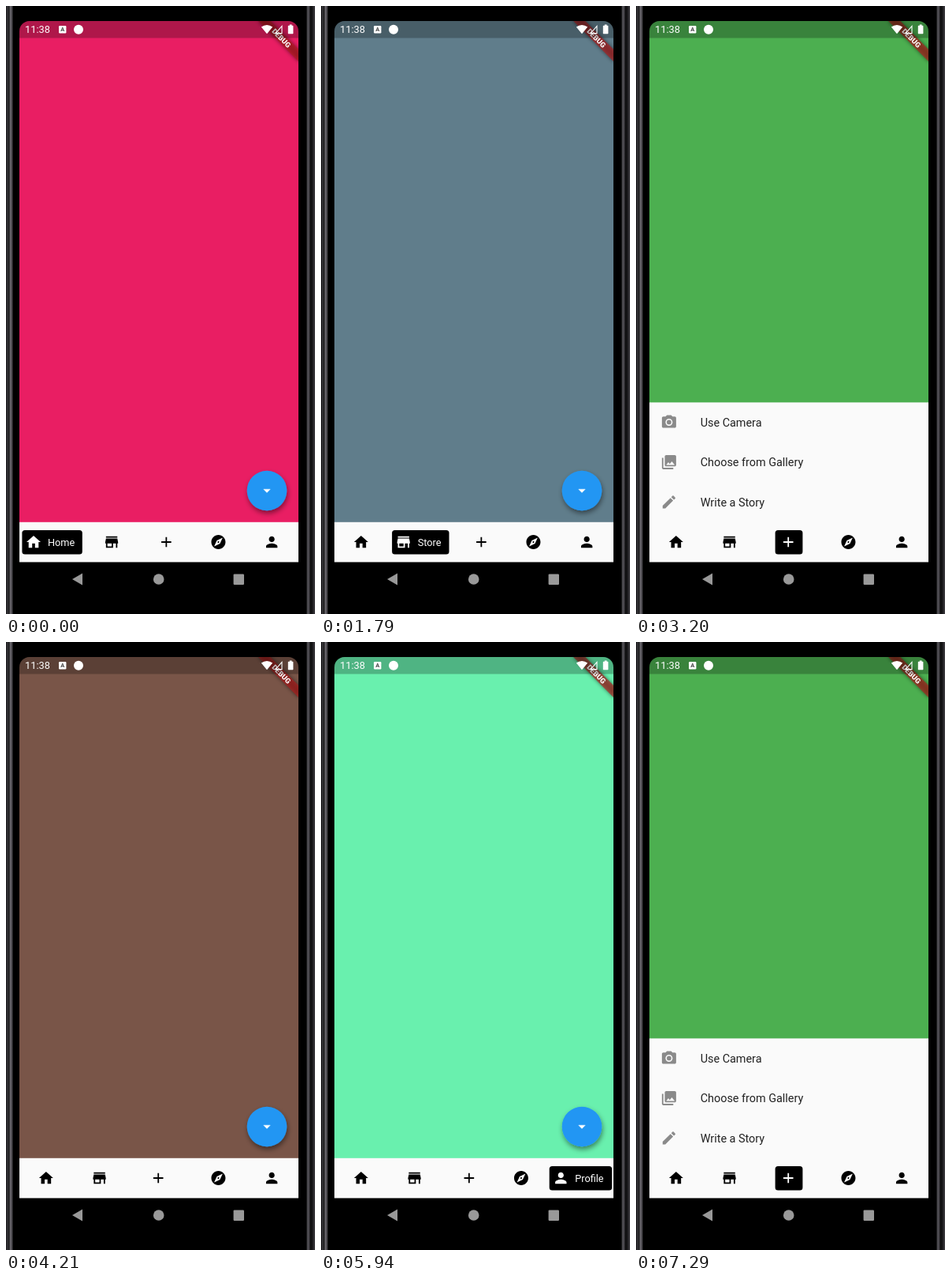
Write an HTML page that moves like this. It is 392 by 769 pixels and loops after 8000 ms.

```html
<!DOCTYPE html>
<html lang="en">
<head>
<meta charset="utf-8">
<title>Tab bar demo</title>
<style>
  html, body { margin: 0; width: 100%; height: 100%; overflow: hidden; background: #000; }
  svg { display: block; width: 100%; height: 100%; font-family: Roboto, "Noto Sans", sans-serif; }
</style>
</head>
<body>
<svg viewBox="0 0 392 769" preserveAspectRatio="xMidYMid meet">
  <defs>
    <linearGradient id="rimL">
      <stop offset="0" stop-color="#1b1a1d"/>
      <stop offset=".3" stop-color="#39383b"/>
      <stop offset=".42" stop-color="#111"/>
      <stop offset=".6" stop-color="#6b686e"/>
      <stop offset=".85" stop-color="#48464b"/>
      <stop offset="1" stop-color="#0a0a0a"/>
    </linearGradient>
    <linearGradient id="rimR">
      <stop offset="0" stop-color="#0a0a0a"/>
      <stop offset=".18" stop-color="#5c5a60"/>
      <stop offset=".35" stop-color="#3a383d"/>
      <stop offset=".5" stop-color="#0c0c0d"/>
      <stop offset=".75" stop-color="#1d1c1f"/>
      <stop offset="1" stop-color="#454348"/>
    </linearGradient>
    <clipPath id="screen"><path d="M17 703.6V32a13 13 0 0 1 13-13H358a13 13 0 0 1 13 13V703.6z"/></clipPath>
    <clipPath id="body"><rect x="17" y="19" width="354" height="634"/></clipPath>
    <filter id="fabShadow" x="-40%" y="-40%" width="180%" height="180%">
      <feDropShadow dx="1" dy="3.5" stdDeviation="3" flood-color="#000" flood-opacity=".45"/>
    </filter>
    <filter id="blur" x="-30%" y="-100%" width="160%" height="300%"><feGaussianBlur stdDeviation="2.6"/></filter>
  </defs>

  <rect width="392" height="769" fill="#000"/>
  <rect width="9" height="769" fill="url(#rimL)"/>
  <rect x="381" width="11" height="769" fill="url(#rimR)"/>

  <g clip-path="url(#screen)">
    <rect id="page" x="17" y="19" width="354" height="634"/>
    <g filter="url(#fabShadow)"><circle cx="331" cy="613" r="25.3" fill="#2196f3"/></g>
    <path d="M326.8 611.2h8.4l-4.2 4.2z" fill="#fff" stroke="#fff" stroke-width=".5" stroke-linejoin="round"/>
    <g clip-path="url(#body)"><g id="sheet"><rect x="17" y="501.4" width="354" height="153" fill="#fafafa"/></g></g>
    <rect x="17" y="652.8" width="354" height="51" fill="#fafafa"/>
    <g id="bar"></g>
    <g transform="translate(371 19) rotate(45)">
      <rect x="-36" y="25.2" width="72" height="10.8" fill="#000" opacity=".5" filter="url(#blur)"/>
      <rect x="-36" y="25.2" width="72" height="10.8" fill="#b71c1c" fill-opacity=".63"/>
      <text y="33.9" font-size="9.2" font-weight="900" fill="#fff" text-anchor="middle">DEBUG</text>
    </g>
    <rect x="17" y="19" width="354" height="21.5" fill="#000" opacity=".25"/>
    <g fill="#fff">
      <text x="24.1" y="34.4" font-size="12.8">11:38</text>
      <rect x="67" y="25" width="9.4" height="9.4" rx="1.2"/>
      <circle cx="92" cy="29.8" r="6"/>
      <path d="M331 35.2L323.8 26.6Q331 21.2 338.2 26.6z"/>
      <path d="M350 25.4V34.6H342z" fill="none" stroke="#fff" stroke-width="1.1"/>
      <path d="M358.4 24.8h1.4v-1.2h2.8v1.2h1.2a.6.6 0 0 1 .6.6v9.2a.6.6 0 0 1-.6.6h-5.4a.6.6 0 0 1-.6-.6v-9.2a.6.6 0 0 1 .6-.6z"/>
    </g>
    <text x="71.7" y="32.4" font-size="7.4" font-weight="700" fill="#444" text-anchor="middle">A</text>
  </g>

  <g fill="#999">
    <path d="M84 725L97 717.4V732.6z"/>
    <circle cx="193.7" cy="725" r="6.8"/>
    <rect x="288.6" y="718.4" width="13.4" height="13.6" rx="1.2"/>
  </g>
</svg>

<script>
const LOOP = 8000, PLUS = 2;
const SLOT = 67.7, WIDE = 83.2, LEFT = 17, MID = 678, ICON = 21.6;

const tabs = [
  { label: 'Home', width: 34, page: '#e91e63', icon: 'M10 20v-6h4v6h5v-8h3L12 3 2 12h3v8z' },
  { label: 'Store', width: 30, page: '#607d8b', icon: 'M20 4H4v2h16V4zm1 10v-2l-1-5H4l-1 5v2h1v6h10v-6h4v6h2v-6h1zm-9 4H6v-4h6v4z' },
  { label: '', width: 0, page: '#4caf50', icon: 'M19 13h-6v6h-2v-6H5v-2h6V5h2v6h6v2z' },
  { label: 'Explore', width: 42, page: '#795548', icon: 'M12 10.9c-.61 0-1.1.49-1.1 1.1s.49 1.1 1.1 1.1 1.1-.49 1.1-1.1-.49-1.1-1.1-1.1zM12 2C6.48 2 2 6.48 2 12s4.48 10 10 10 10-4.48 10-10S17.52 2 12 2zm2.19 12.19L6 18l3.81-8.19L18 6l-3.81 8.19z' },
  { label: 'Profile', width: 37, page: '#69f0ae', icon: 'M12 12c2.21 0 4-1.79 4-4s-1.79-4-4-4-4 1.79-4 4 1.79 4 4 4zm0 2c-2.67 0-8 1.34-8 4v2h16v-2c0-2.66-5.33-4-8-4z' }
];

const options = [
  ['Use Camera', 'M12 8.8a3.2 3.2 0 1 0 0 6.4 3.2 3.2 0 0 0 0-6.4zM9 2L7.17 4H4c-1.1 0-2 .9-2 2v12c0 1.1.9 2 2 2h16c1.1 0 2-.9 2-2V6c0-1.1-.9-2-2-2h-3.17L15 2H9zm3 15c-2.76 0-5-2.24-5-5s2.24-5 5-5 5 2.24 5 5-2.24 5-5 5z'],
  ['Choose from Gallery', 'M22 16V4c0-1.1-.9-2-2-2H8c-1.1 0-2 .9-2 2v12c0 1.1.9 2 2 2h12c1.1 0 2-.9 2-2zm-11-4l2.03 2.71L16 11l4 5H8l3-4zM2 6v14c0 1.1.9 2 2 2h14v-2H4V6H2z'],
  ['Write a Story', 'M3 17.25V21h3.75L17.81 9.94l-3.75-3.75L3 17.25zM20.71 7.04c.39-.39.39-1.02 0-1.41l-2.34-2.34c-.39-.39-1.02-.39-1.41 0l-1.83 1.83 3.75 3.75 1.83-1.83z']
];

// Each tap: when it lands, when it settles, steps shown, tab chosen, leftover tint of the old pill.
const taps = [
  { at: 1230, end: 1790, steps: 8, to: 1, tint: 0 },
  { at: 2720, end: 3200, steps: 7, to: 2, tint: .015 },
  { at: 4210, end: 4690, steps: 7, to: 3, tint: 0 },
  { at: 5460, end: 5940, steps: 7, to: 4, tint: 0 },
  { at: 6820, end: 7290, steps: 7, to: 2, tint: .015 }
];

const byId = id => document.getElementById(id);
const lerp = (a, b, p) => a + (b - a) * p;
const easeInOut = p => p * p * (3 - 2 * p);
const easeOut = p => 1 - (1 - p) ** 3;

function set(node, attrs) {
  for (const key in attrs) node.setAttribute(key, attrs[key]);
  return node;
}

function add(parent, tag, attrs) {
  return parent.appendChild(set(document.createElementNS('http://www.w3.org/2000/svg', tag), attrs));
}

function iconAt(x, y) {
  return `translate(${x - ICON / 2} ${y - ICON / 2}) scale(${ICON / 24})`;
}

options.forEach(([label, icon], i) => {
  const y = 526.4 + i * 50.5;
  add(byId('sheet'), 'path', { d: icon, fill: '#8a8a8a', 'fill-rule': 'evenodd', transform: iconAt(41.9, y) });
  add(byId('sheet'), 'text', { x: 81.7, y: y + 5.1, 'font-size': 14.4, fill: '#222' }).textContent = label;
});

for (const tab of tabs) {
  tab.pill = add(byId('bar'), 'rect', { y: 663, height: 30.6, rx: 3.6 });
  tab.glyph = add(byId('bar'), 'path', { d: tab.icon, 'fill-rule': 'evenodd' });
  tab.text = add(byId('bar'), 'text', { y: 682.7, 'font-size': 12.7, fill: '#fff' });
  tab.text.textContent = tab.label;
}

function stateAt(t) {
  const state = { from: -1, to: 0, p: 1, tint: 0 };
  for (const tap of taps) {
    if (t < tap.at) break;
    const last = tap.steps - 1;
    const step = Math.floor((t - tap.at) / (tap.end - tap.at) * last + 1e-6);
    Object.assign(state, {
      from: state.to, to: tap.to,
      p: Math.min(1, step / last),
      tint: step === 0 ? tap.tint : 0
    });
  }
  return state;
}

function render(t) {
  const { from, to, p, tint } = stateAt(t);
  const grow = easeInOut(p);
  let x = LEFT;

  tabs.forEach((tab, i) => {
    const sel = i === to ? grow : i === from ? 1 - grow : 0;
    const shown = i === to ? grow : 0;
    const slot = lerp(SLOT, WIDE, sel);
    const mid = x + slot / 2;
    const full = tab.width ? tab.width + 42.4 : 34.8;
    const width = lerp(34, full, sel);
    const iconX = mid + (i === PLUS ? lerp(1.6, -.8, sel) : lerp(0, 14.6 - full / 2, sel));
    const shade = Math.round(255 * shown);

    set(tab.pill, { x: mid - width / 2, width, opacity: i === from ? tint : shown });
    set(tab.glyph, { fill: `rgb(${shade},${shade},${shade})`, transform: iconAt(iconX, MID) });
    set(tab.text, { x: iconX + 18, opacity: shown ** 2 });
    x += slot;
  });

  byId('page').setAttribute('fill', tabs[to].page);
  const rise = to === PLUS ? easeOut(p) : 0;
  byId('sheet').setAttribute('transform', `translate(0 ${153 * (1 - rise)})`);
}

const start = performance.now();
function tick() {
  render((performance.now() - start) % LOOP);
  requestAnimationFrame(tick);
}
tick();
</script>
</body>
</html>
```
